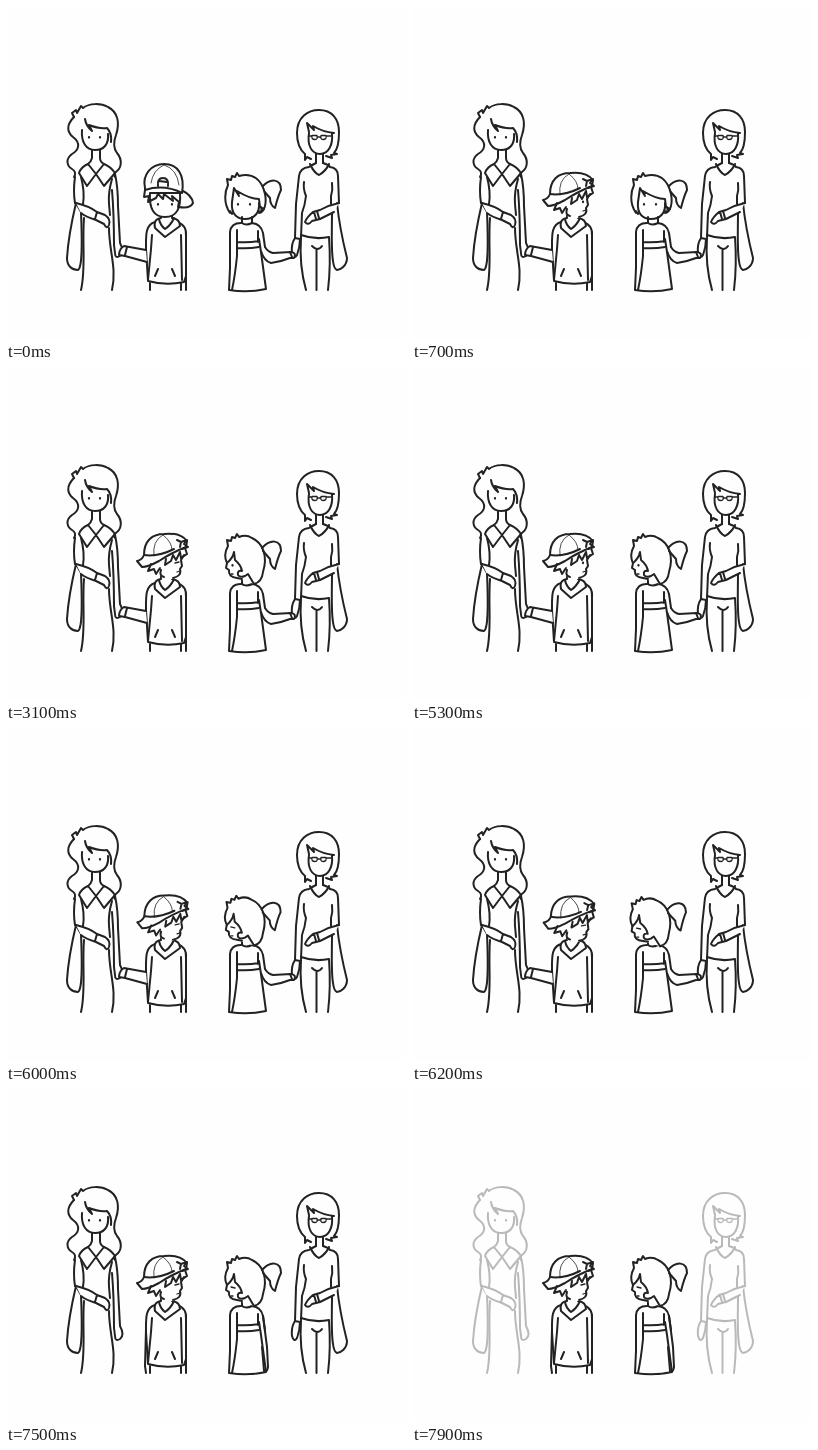
Recreate the animation shown at these times as an HTML page. Size 400 px wide and 333 px high, loop 8 s.

```html
<!DOCTYPE html>
<html lang="en">
<head>
<meta charset="utf-8">
<title>Two families</title>
<style>
html, body { margin: 0; width: 100%; height: 100%; overflow: hidden; background: #fefefe; }
svg { display: block; width: 100vw; height: 100vh; }
path { fill: none; }
.ink { stroke: #222; stroke-width: 2; stroke-linecap: round; stroke-linejoin: round; }
.skin { fill: #fefefe; }
.dark { fill: #222; stroke: none; }
.thin { stroke-width: .8; }
.fine { stroke-width: 1.3; }
.dots { stroke-width: 2.2; }
</style>
</head>
<body>
<svg viewBox="0 0 400 333">
  <g id="parents" class="ink">
    <!-- mother on the left -->
    <path d="M68 111L66 107L70 104L71 107L75 100L77 102C83 97 95 97 102 101C112 106 114 117 110 129C107 137 108 143 111 147C117 154 115 162 111 165Q107 168 109 171"/>
    <path d="M68 111C60 119 61 126 67 131C75 137 73 144 66 148C59 153 61 160 66 163Q71 166 68 171"/>
    <path d="M76 124C75 136 80 144 89 144C98 144 103 138 102 128M79 113Q80 120 86 125L83 119Q93 123 101 122Q106 127 105 136"/>
    <path class="dots" d="M83 131v.6M94 131v.6"/>
    <path d="M86 144V152Q85 156 82 158M94 144V152Q94 156 98 158"/>
    <path d="M82 158Q75 161 73 167L81 180L90 168L98 180L109 167Q105 161 98 158M82 158L90 168L98 158"/>
    <path d="M69 171Q67 185 69 197M75 171Q79 186 77 198M106 173Q102 187 103 198L104 209"/>
    <path d="M109 168Q112 181 112 200L114 237Q119 246 114 250Q109 253 109 247L108 239Q108 208 106 184"/>
    <path class="skin" d="M70 197C66 214 62 235 61 252C61 260 66 264 72 264C77 261 76 230 75 206Z"/>
    <path class="skin" d="M70 197Q83 200 91 206L99 209Q105 213 103 219Q101 224 98 218Q94 216 90 214Q80 211 75 207M91 206L89 213"/>
    <path d="M78 212C76 238 80 263 75 284M103 222C103 245 111 262 106 284"/>
    <!-- mother on the right -->
    <path d="M305 153L301 151L299 154V148C293 143 291 136 291 127C291 111 302 104 313 104C326 104 333 113 333 126C333 137 331 144 328 147L331 148L325 149L326 152L320 150"/>
    <path d="M303 127C301 140 306 148 314 148C323 148 327 138 326 128M303 126L301 117L308 124L307 120Q317 126 328 127"/>
    <path class="fine" d="M306 129.5H311Q312 133.500 309 133.500Q305 133.500 306 129.500ZM315 129.500H320Q321 133.500 317 133.500Q314 133.500 315 129.500ZM311 131H315M303 130H306M320 130H325"/>
    <path d="M310 148V157M317 148V157M304 158Q308 167 313 169Q320 165 323 158"/>
    <path d="M310 157Q306 159 303 161Q294 162 293 170L290 198L289 232M298 176Q297 183 300 190Q299 199 296 207L295 231M317 157Q323 159 324 161Q332 162 332 170L333 197M326 177Q327 184 325 190V198"/>
    <path d="M289 232Q285 238 286 247Q288 254 291 249Q294 241 294 233L289 232"/>
    <path class="skin" d="M331 197C333 217 338 240 341 252C341 260 334 264 331 264Q328 263 327 255C325 243 326 224 326 206Z"/>
    <path class="skin" d="M333 197Q323 199 314 204L307 206Q301 211 299 216Q302 220 306 215L314 213L328 206M311 205L313 212M308 206L310 213"/>
    <path d="M295 229Q309 234 323 231M295 232Q293 259 300 284M323 231Q325 259 322 284M306 240Q309 243 311 243Q314 243 316 240M310.500 244V284"/>
  </g>

  <g id="kids" class="ink">
    <!-- boy -->
    <path class="skin" d="M149 216C139 219 140 230 140 243L142 275Q160 280 178 276L180 270V230Q181 219 171 216"/>
    <path d="M146 229L145 243L142 274M175 229L176 274M144 277V284M175 277V284M180 270V284"/>
    <path d="M152 263L149 270M166 263L169 270"/>
    <path class="skin" d="M155 207V212Q147 213 149 222L159 231L174 220Q174 213 166 212V207"/>
    <path d="M153 213Q154 219 159 223Q165 219 168 212"/>
    <!-- girl -->
    <path class="skin" d="M235 217Q225 217 224 226V262L223 284Q242 287 260 283L255 246L253 233"/>
    <path d="M231 224V250Q229 270 226 284M231 236Q242 237 253 235M231 242Q242 243 253 241M252 225V236"/>
    <path d="M236 211V217Q240 220 246 217V211M246 217Q255 218 257 227L259 241"/>
  </g>

  <g id="held" class="ink">
    <path class="skin" d="M140 244L118 240Q113 243 113 249L119 250L141 256"/>
    <path d="M121 241L119 249"/>
    <path class="skin" d="M259 241Q262 246 267 247L285 246Q291 247 288 252L284 252Q274 256 265 257Q258 255 255 245"/>
    <path d="M284 246L286 251"/>
  </g>
  <g id="free" class="ink">
    <path d="M140 240L139 277L140 284M257 227L261 258L262 278Q261 284 258 282L256 258"/>
  </g>

  <g id="boyFront" class="ink">
    <path class="skin" d="M175 184Q186 189 187 197Q184 203 173 201"/>
    <path class="skin" d="M144 187C143 203 148 211 159 211C171 211 175 202 174 187Z"/>
    <path class="skin" d="M139 182C136 169 145 158 158 158C172 158 179 169 176 187Q158 178 139 184Z"/>
    <path class="thin" d="M145 177Q147 164 158 159Q171 163 173 179"/>
    <path d="M152 180Q151 172 157 172Q163 172 162 180M153 175L161 176"/>
    <path d="M139 184L138 191L143 190L142 196L150 192L152 188L157 193L158 188L167 195L166 190L173 196L172 201"/>
    <path class="dots" d="M152 198v.6M166 198v.6"/>
  </g>
  <g id="boySide" class="ink">
    <path class="skin" stroke="none" d="M145 194L153 207L157 212L167 212L174 209L176 203L178 188Z"/>
    <path d="M178 188L175 193L176 199L174 202Q176 209 167 211"/>
    <path class="skin" d="M138 188C138 174 146 167 158 167Q174 165 181 174L180 180Q165 186 153 194Q142 200 136 200L131 194Q136 193 138 188Z"/>
    <path class="thin" d="M148 189Q146 174 157 168Q166 175 166 183"/>
    <path d="M138 188Q152 190 168 182M171 173L175 175L181 173L178 177L182 180L176 182M175 175L174 180"/>
    <path d="M145 197L142 204L148 202L150 207L154 201M155 203Q153 209 158 210M160 192L159 198L165 194L167 188L170 193L174 185L175 191L181 187L179 181"/>
    <path id="boyOpen" class="dots" d="M171 195.500v.6"/>
    <path id="boyShut" class="fine" d="M169 196L173 195"/>
    <path id="boyMouth" class="fine" d="M171 205L174 204"/>
    <path id="boyPout" class="fine" d="M174 201L178 203L174 205"/>
  </g>

  <g id="girlFront" class="ink">
    <path class="skin" d="M256 181C264 172 275 172 275 184Q272 190 269 202Q264 199 264 192L257 184"/>
    <path class="skin" d="M224 207C217 197 219 185 222 179L221 173L225 174L226 170L229 171L231 167L233 170C247 166 256 174 259 188C261 198 258 207 253 207"/>
    <path d="M226 196C225 207 230 213 239 213C248 213 254 207 253 197M226 196L228 182L233 190L231 185Q244 193 253 193L254 201L258 203M224 205L226 208M252 205Q257 207 255 201"/>
    <path class="dots" d="M232 198v.6M244 198v.6"/>
  </g>
  <g id="girlSide" class="ink">
    <path class="skin" d="M256 181C264 172 275 172 275 184Q272 190 269 202Q264 199 264 192L257 184"/>
    <path class="skin" stroke="none" d="M222 182L221 200L226 209L236 213L248 217L257 206L260 190L246 171L233 170Z"/>
    <path d="M248 217Q256 215 257 205C262 189 257 176 246 171Q240 167 233 170L231 167L229 171L226 170L225 174L221 173L222 179Q217 188 221 196L220 201L223 203Q222 210 231 211L236 212"/>
    <path d="M221 196Q227 191 228 185L229 193Q235 198 236 204M236 204Q231 203 232 208Q234 211 239 209L242 207L248 217"/>
    <path id="girlOpen" class="dots" d="M226.500 198v.6"/>
    <path id="girlShut" class="fine" d="M225 198L229 199"/>
    <path id="girlMouth" class="fine" d="M225 207L227 207"/>
    <path id="girlSmile" class="fine" d="M224 206Q227 209 229 206"/>
  </g>

  <path id="heart" class="ink fine" d="M0 4C-8 -1 -3 -6 0 -2C3 -6 8 -1 0 4Z"/>
</svg>
<script>
const LOOP = 8000;
const el = id => document.getElementById(id);
const show = (id, on) => { el(id).style.display = on ? '' : 'none'; };
const pose = (id, value) => el(id).setAttribute('transform', value);
const within = (t, a, b) => t >= a && t < b;
const nods = [0.4, 0.75, 1, 0.7, 0.35, 0];

// visible spans in ms
const spans = {
  held: [[0, 7500]],
  free: [[7500, LOOP]],
  boyFront: [[0, 700]],
  boySide: [[700, LOOP]],
  girlFront: [[0, 1200]],
  girlSide: [[1200, LOOP]],
  boyOpen: [[700, 2000], [4100, 6000]],
  boyShut: [[2000, 4100], [6000, LOOP]],
  boyMouth: [[700, 2150], [2300, 2450], [2600, LOOP]],
  boyPout: [[2150, 2300], [2450, 2600]],
  girlOpen: [[1200, 4600], [5300, 6000]],
  girlShut: [[4600, 5300], [6000, LOOP]],
  girlMouth: [[1200, 4600], [5300, LOOP]],
  girlSmile: [[4600, 5300]],
  heart: [[2600, 3100]]
};

function draw(t) {
  for (const id in spans) show(id, spans[id].some(([a, b]) => within(t, a, b)));

  const nod = within(t, 6000, 6500) ? nods[Math.floor((t - 6000) / 100)] : 0;
  pose('boySide', `translate(0 ${1.6 * nod}) rotate(${2 * nod} 160 211)`);
  pose('girlSide', `translate(0 ${1.6 * nod}) rotate(${-2 * nod} 240 213)`);

  const rise = Math.max(0, Math.min(4, Math.floor((t - 2600) / 100))) / 4;
  pose('heart', `translate(${180 + 11 * rise} ${201 - 39 * rise}) scale(${0.6 + 0.4 * rise})`);

  el('parents').style.stroke = t < 7800 ? '#222' : t < 7900 ? '#6e6e6e' : '#b9b9b9';
}

const start = performance.now();
function tick() {
  draw((performance.now() - start) % LOOP);
  requestAnimationFrame(tick);
}
tick();
</script>
</body>
</html>
```
